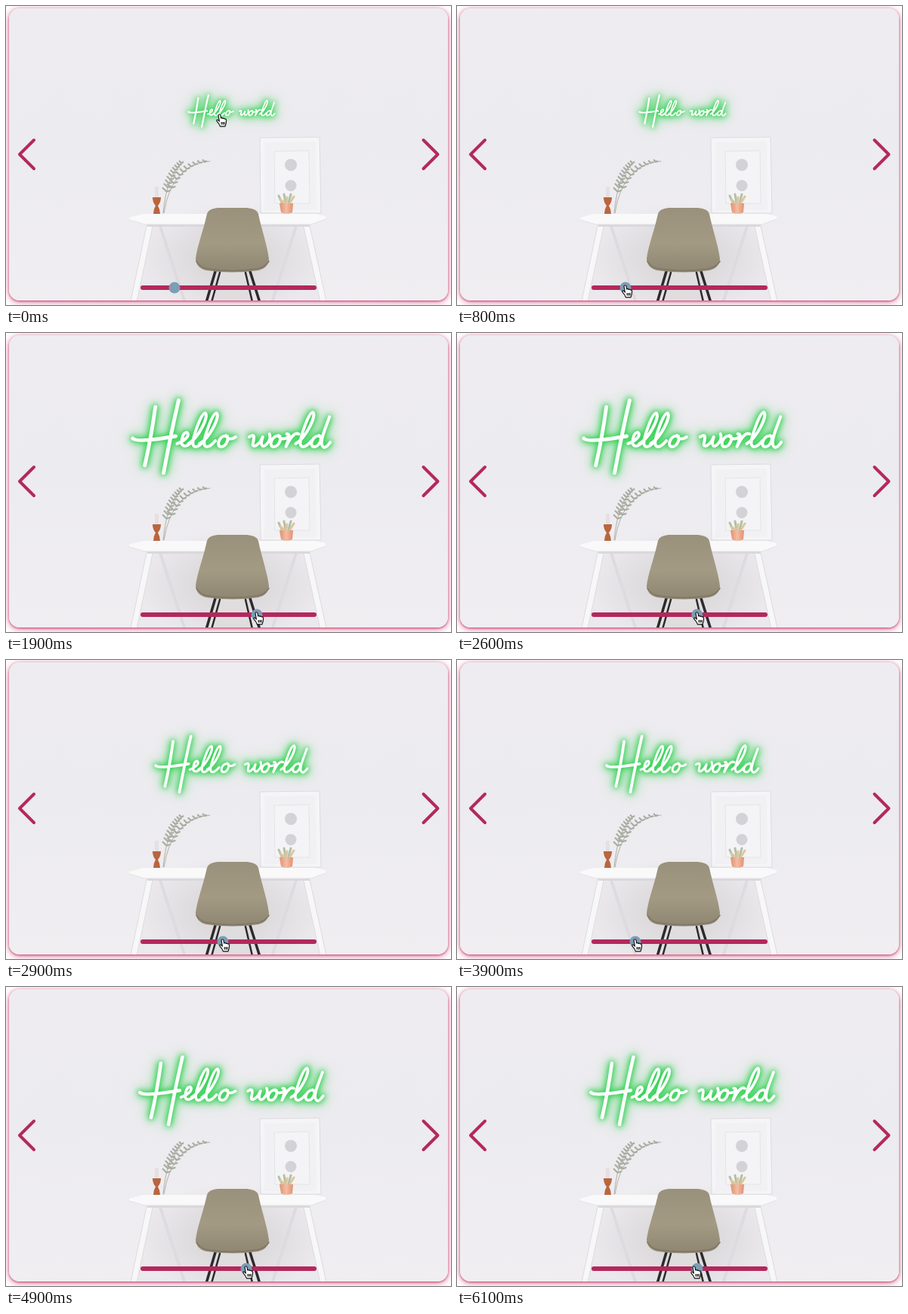
An HTML page for the animation above (6200 ms loop, 589 by 397 pixels).

```html
<!DOCTYPE html>
<html lang="en">
<head>
<meta charset="utf-8">
<title>Neon sign</title>
<style>
  html, body { margin: 0; width: 100%; height: 100%; overflow: hidden; background: #fff; }
  .stage { position: relative; width: 589px; height: 397px; overflow: hidden; background: #fff; }
  .card {
    position: absolute; left: 4px; top: 3px; width: 581px; height: 388px;
    border-radius: 14px; background: #eeecf0;
    box-shadow: 0 1px 3px rgba(185, 35, 90, .75), 0 2px 10px rgba(205, 45, 105, .6);
  }
  svg { position: absolute; left: 0; top: 0; display: block; }
  .line { fill: none; stroke-linecap: round; stroke-linejoin: round; }
  .butt { fill: none; }
  .arrow { stroke: #b4285c; stroke-width: 4; }
  .neon {
    filter: drop-shadow(0 0 3px #2fcf4f) drop-shadow(0 0 5px #3ad55a)
            drop-shadow(0 0 8px rgba(70, 215, 100, .45));
  }
  .neon path { stroke: #fff; stroke-width: 5; }
  .neon #letters { stroke-width: 4; }
  .stem { stroke: #aeb1a9; stroke-width: 1; }
  .leaf { stroke: #a9ada2; stroke-width: 2.2; }
</style>
</head>
<body>
<div class="stage">
  <div class="card"></div>
  <svg width="589" height="397" viewBox="0 0 589 397">
    <defs>
      <clipPath id="frame"><rect x="4" y="3" width="581" height="388" rx="14"/></clipPath>
      <linearGradient id="wall" x2="0" y2="1">
        <stop offset="0" stop-color="#eeecf0"/>
        <stop offset=".45" stop-color="#ecebef"/>
        <stop offset="1" stop-color="#f0eef1"/>
      </linearGradient>
      <radialGradient id="shade">
        <stop offset=".3" stop-color="#8a8080" stop-opacity=".16"/>
        <stop offset="1" stop-color="#8a8080" stop-opacity="0"/>
      </radialGradient>
      <linearGradient id="shell" x2="0" y2="1">
        <stop offset="0" stop-color="#9a917c"/>
        <stop offset=".55" stop-color="#a39a84"/>
        <stop offset="1" stop-color="#8f8672"/>
      </linearGradient>
      <linearGradient id="pot">
        <stop offset="0" stop-color="#e0906f"/>
        <stop offset=".5" stop-color="#f3bda4"/>
        <stop offset="1" stop-color="#e0906f"/>
      </linearGradient>
    </defs>

    <g clip-path="url(#frame)">
      <rect width="589" height="397" fill="url(#wall)"/>

      <!-- picture -->
      <path d="M336 175L415 174L417 275H337Z" fill="#f5f5f7" stroke="#dcdbdf"/>
      <path d="M342 181L410 180L411 271H342Z" fill="#f1f0f3"/>
      <path d="M355 193L401 192L402 262H356Z" fill="#f4f3f5" stroke="#e4e3e7"/>
      <g fill="#d3d2d6"><circle cx="377" cy="211" r="8"/><circle cx="377" cy="238.500" r="7.500"/></g>

      <!-- desk -->
      <path d="M187 290H402L426 397H164Z" fill="#ebe9ec"/>
      <ellipse cx="298" cy="335" rx="120" ry="75" fill="url(#shade)"/>
      <g class="butt">
        <path d="M203 289L238 397M385 289L351 397" stroke="#dddbdf" stroke-width="4"/>
        <path d="M191 288L168 397M397 288L421 397" stroke="#dddbdf" stroke-width="9"/>
        <path d="M191 288L168 397M397 288L421 397" stroke="#f7f7f8" stroke-width="7"/>
      </g>
      <path d="M187 289H402V293H187Z" fill="#d9d7db"/>
      <path d="M163 281L181 276H409L423 279V283L404 290H184L163 284Z" fill="#f9f9fa"/>
      <path d="M163 284L184 290H404L423 283" class="line" stroke="#e3e1e5"/>

      <g id="plant" class="line"></g>

      <!-- vase -->
      <path d="M197 240H202V254H197Z" fill="#e6e0e1"/>
      <path d="M194 254H205Q205 261 201 265Q204 270 204 276H195Q195 270 198 265Q194 261 194 254Z" fill="#b9653f"/>

      <!-- succulent -->
      <g class="line" stroke-width="3">
        <path d="M365 261L361 252M370 261L368 250M374 261L377 250" stroke="#b3c0a8"/>
        <path d="M368 261L363 257M376 261L381 253M371 260L372 254" stroke="#dcc79c"/>
      </g>
      <path d="M362 262H380L379 274Q371 278 364 274Z" fill="url(#pot)"/>

      <!-- chair -->
      <path d="M283 352H317L326 397H273Z" fill="#e0dddf"/>
      <g class="line" stroke="#2c2a2b">
        <path d="M278 349L264 397M322 349L337 397" stroke-width="3.500"/>
        <path d="M283 354L271 397M317 354L327 397" stroke-width="2.500"/>
      </g>
      <path d="M266 276Q268 269 280 268H319Q332 269 334 276C338 296 346 318 348 336Q347 348 334 351Q300 356 265 351Q252 348 251 336C253 318 262 296 266 276Z" fill="url(#shell)"/>
      <path d="M252 339Q258 348 268 349Q300 354 332 349Q343 347 348 339" class="line" stroke="#7f7765" stroke-width="1.500"/>
    </g>

    <g class="neon line" role="img" aria-label="Hello world">
      <g id="sign">
        <path d="M197 98Q192 136 183 176M228 89Q218 132 208 186M167 140Q172 146 224 137"/>
        <path id="letters"/>
      </g>
    </g>

    <path class="line arrow" d="M37 178L18 197L37 216"/>
    <path class="line arrow" d="M552.500 178L571.500 197L552.500 216"/>
    <rect x="178" y="371" width="233" height="6" rx="3" fill="#b4285c"/>
    <circle id="thumb" cy="374" r="7.500" fill="#7d9db4"/>

    <path id="hand" fill="#fff" stroke="#111" stroke-width="1.200" stroke-linejoin="round" d="
      M3 2Q4.500 -.5 6 2L6.600 6Q8 4.500 9 6.400Q10.500 5.500 11.400 7Q13.600 6.500 13.600 9Q13.600 13 12 16.800H5.400
      Q4.500 13.500 1 9.800Q.5 7 3 8.600L4.400 10ZM7.200 11V14.500M9.200 11V14.500M11 11V14.500"/>
  </svg>
</div>

<script>
  const LOOP = 6200, STEP = 100;
  const START_X = 223;
  // Slider drags: press time, release time, thumb x at release.
  const drags = [
    { from: 950, to: 1800, x: 332 },
    { from: 2450, to: 2850, x: 287 },
    { from: 3650, to: 3900, x: 236 },
    { from: 4250, to: 4800, x: 318 }
  ];

  const [sign, letters, plant, thumb, hand] =
    ["sign", "letters", "plant", "thumb", "hand"].map(id => document.getElementById(id));

  // Cursive strokes on a common baseline: loops make e and l, rings make o and d.
  function loop(x, h) {
    const tx = x + 6 + .36 * h, ty = 152 - h;
    return `M${x} 147C${x + 5 + .2 * h} ${148 - .2 * h} ${tx + 5} ${ty + 4} ${tx} ${ty}` +
      `C${tx - 6} ${ty} ${x + 6} ${144 - .1 * h} ${x + 6} 146S${x + 12} 154 ${x + 21} 143`;
  }
  const ring = x =>
    `M${x + 7} 137C${x - 3} 134 ${x - 9} 150 ${x - 2} 151S${x + 11} 139 ${x + 5} 136`;
  const tail = x => `Q${x + 9} 144 ${x + 18} 138`;

  letters.setAttribute("d", [
    loop(226, 20), loop(241, 46), loop(256, 46), ring(286), tail(286),
    "M322 138C331 132 328 141 327 147S335 150 340 138C336 150 340 153 345 148S351 139 349 134",
    ring(356), tail(356),
    "M372 134C378 133 374 142 371 151Q381 130 388 134",
    loop(384, 47), ring(410),
    "M429 111C424 126 416 142 419 149S427 149 430 145"
  ].join(""));

  // A stem is a quadratic curve with paired leaves that shrink toward the tip.
  function branch(a, c, b) {
    let leaves = "";
    for (let k = .3; k <= 1; k += .07) {
      const [x, y] = [0, 1].map(i =>
        (1 - k) ** 2 * a[i] + 2 * k * (1 - k) * c[i] + k * k * b[i]);
      const size = 6 - 4 * k;
      leaves += `M${x - size} ${y - size}L${x} ${y}L${x + size} ${y - size / 3}`;
    }
    return `<path class="stem" d="M${a}Q${c} ${b}"/><path class="leaf" d="${leaves}"/>`;
  }
  plant.innerHTML =
    branch([208, 275], [213, 222], [235, 206]) + branch([209, 275], [219, 210], [270, 206]);

  const mix = (a, b, k) => a + (b - a) * k;
  function ramp(t, from, to) {
    const k = Math.min(1, Math.max(0, (t - from) / (to - from)));
    return k * k * (3 - 2 * k);
  }

  const thumbAt = t => drags.reduce((x, d) => mix(x, d.x, ramp(t, d.from, d.to)), START_X);
  // The sign takes its new size only once the thumb is released.
  const releasedAt = t => drags.reduce((x, d) => t > d.to ? d.x : x, START_X);
  const scaleAt = t => (116 + 1.37 * (releasedAt(t) - START_X)) / 267;

  function draw(ms) {
    const t = Math.floor((ms % LOOP) / STEP) * STEP;
    const x = thumbAt(t), scale = scaleAt(t);
    const reach = ramp(t, 0, 500), drift = 4 * ramp(t, 5800, 6100);
    thumb.setAttribute("cx", x);
    sign.setAttribute("transform",
      `translate(298.5 ${141 - 3 * scale}) scale(${scale}) translate(-298.5 -138)`);
    hand.setAttribute("transform",
      `translate(${Math.round(mix(278, x - 5 - drift, reach))} ${Math.round(mix(143, 370, reach))})`);
  }

  const start = performance.now();
  function tick() {
    draw(performance.now() - start + 2);
    requestAnimationFrame(tick);
  }
  tick();
</script>
</body>
</html>
```
